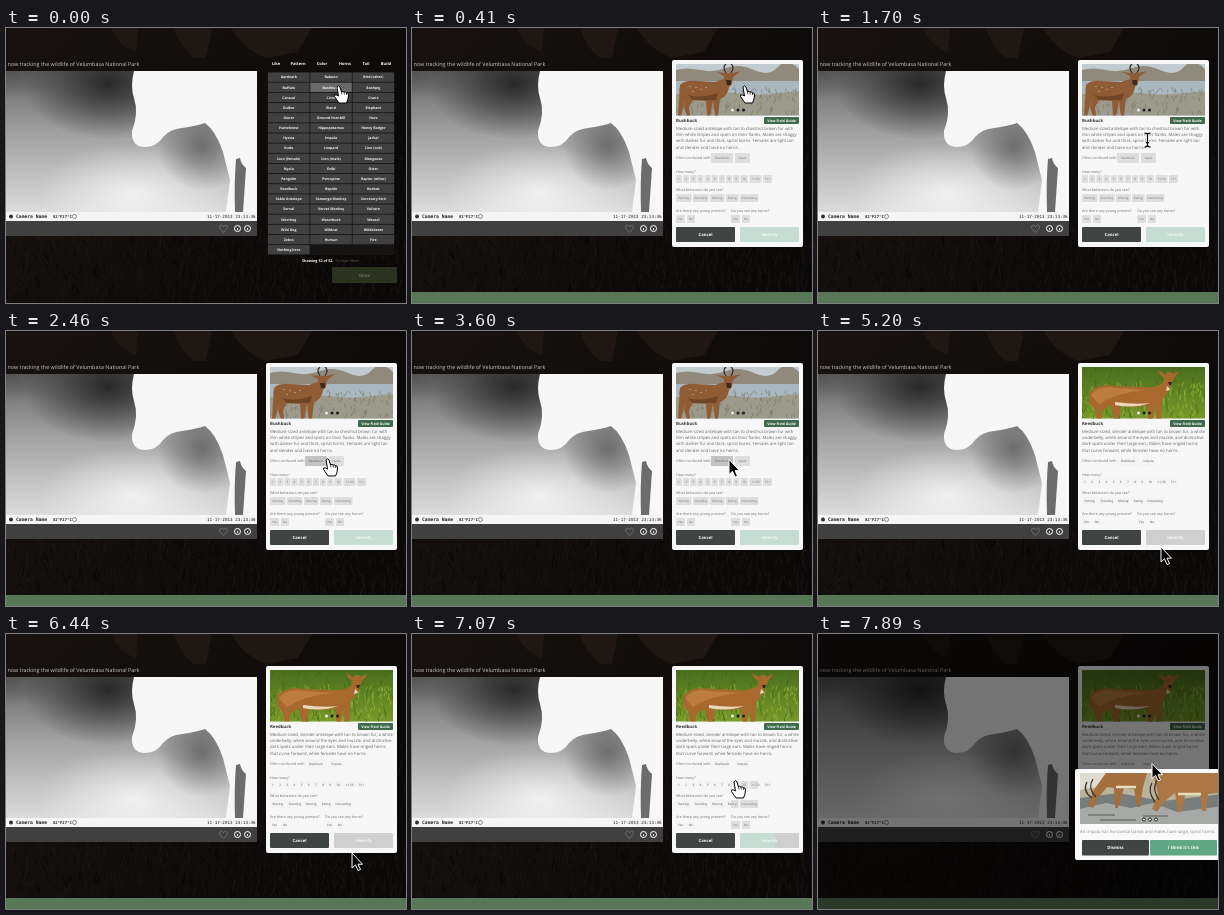
An HTML page that plays this animation: 400x275 px, repeating every 8000 ms.

```html
<!DOCTYPE html>
<html lang="en">
<head>
<meta charset="utf-8">
<title>Wildlife identification</title>
<style>
  html, body { margin: 0; width: 100%; height: 100%; overflow: hidden; background: #100d0c; }
  body > svg { display: block; width: 400px; height: 275px; }
  text { font-family: "Open Sans", sans-serif; text-rendering: geometricPrecision; }
  .mono { font-family: "DejaVu Sans Mono", monospace; }
  .b { font-weight: 700; }
  .mid { text-anchor: middle; }
</style>
</head>
<body>
<script>
const LOOP = 8000;

const rect = (x, y, w, h, fill, r = 0) =>
  `<rect x="${x}" y="${y}" width="${w}" height="${h}" rx="${r}" fill="${fill}"/>`;
const path = (d, fill, stroke = 'none', width = 1) =>
  `<path d="${d}" fill="${fill}" stroke="${stroke}" stroke-width="${width}" stroke-linejoin="round"/>`;
const circle = (x, y, r, fill, stroke = 'none') =>
  `<circle cx="${x}" cy="${y}" r="${r}" fill="${fill}" stroke="${stroke}"/>`;
const ellipse = (x, y, rx, ry, fill) =>
  `<ellipse cx="${x}" cy="${y}" rx="${rx}" ry="${ry}" fill="${fill}"/>`;
// y is the vertical middle of the line
const text = (s, x, y, size, fill, cls = '') =>
  `<text x="${x}" y="${y + size * 0.36}" font-size="${size}" fill="${fill}" class="${cls}">${s}</text>`;
const button = (s, x, y, w, h, fill, color, size, cls = 'mid', r = 1) =>
  rect(x, y, w, h, fill, r) + text(s, x + w / 2, y + h / 2, size, color, cls);
const group = (id, body) => `<g id="${id}">${body}</g>`;
const crop = (x, y, w, h, box, body) =>
  `<svg x="${x}" y="${y}" width="${w}" height="${h}" viewBox="${box}" preserveAspectRatio="xMidYMid slice">${body}</svg>`;

let seed = 7;
const random = () => (seed = seed * 16807 % 2147483647) / 2147483647;
const strokes = (n, x, y, w, h, len, lean) => {
  let d = '';
  for (let i = 0; i < n; i++) {
    d += `M${(x + random() * w).toFixed(1)} ${(y + random() * h).toFixed(1)}` +
         `l${((random() - 0.5) * lean).toFixed(1)} ${(-len * (0.4 + random())).toFixed(1)}`;
  }
  return d;
};

const definitions = `<defs>
  <linearGradient id="night" x2="0" y2="1"><stop stop-color="#666"/><stop offset=".45" stop-color="#a2a2a2"/><stop offset="1" stop-color="#dcdcdc"/></linearGradient>
  <radialGradient id="glow"><stop stop-color="#fff" stop-opacity=".7"/><stop offset="1" stop-color="#fff" stop-opacity="0"/></radialGradient>
  <radialGradient id="shade"><stop stop-color="#1c1c1c" stop-opacity=".85"/><stop offset="1" stop-color="#1c1c1c" stop-opacity="0"/></radialGradient>
  <radialGradient id="softShade"><stop stop-color="#444" stop-opacity=".6"/><stop offset="1" stop-color="#444" stop-opacity="0"/></radialGradient>
  <linearGradient id="page" x2="1" y2=".4"><stop stop-color="#17120f"/><stop offset="1" stop-color="#0b0908"/></linearGradient>
  <linearGradient id="lawn" x2="0" y2="1"><stop stop-color="#45691d"/><stop offset="1" stop-color="#7d9f2b"/></linearGradient>
  <clipPath id="passed"><path d="M319 143H346V196H363V214H319Z"/></clipPath>
</defs>`;

const background = rect(0, 0, 400, 275, 'url(#page)') +
  path('M105 0Q112 18 130 24L132 0ZM168 0Q174 20 188 30H200L206 0ZM225 0Q238 22 260 30L292 24 306 0Z', '#1f1713') +
  path(strokes(420, 0, 205, 400, 72, 11, 9) + strokes(90, 252, 50, 148, 170, 11, 9), 'none', '#1e1916', 0.6) +
  path(strokes(160, 0, 205, 400, 72, 9, 12), 'none', '#080606', 0.8);

const nightPhoto = crop(0, 43, 251, 141, '0 43 251 141',
  rect(0, 43, 251, 141, 'url(#night)') +
  ellipse(102, 56, 85, 56, 'url(#shade)') + ellipse(0, 43, 60, 28, 'url(#softShade)') +
  ellipse(128, 165, 95, 50, 'url(#glow)') + ellipse(196, 118, 45, 45, 'url(#softShade)') +
  path('M128 43Q124 58 128 70Q133 85 126 103Q125 118 138 119Q151 119 157 109Q164 101 176 100Q190 98 199 95Q210 103 217 124L224 152 220 184H251V43Z', '#f7f7f7') +
  path('M230 131Q228 155 229 184H237L240 140Q235 136 234 130Z', '#6c6c6c'));

const viewer =
  text('now tracking the wildlife of Velumbasa National Park', 1.5, 36, 5.4, '#c9c6c4') +
  nightPhoto + rect(0, 184, 251, 9, '#f5f5f5') + circle(5, 188.5, 2, '#333') +
  text('Camera Name', 10, 188.5, 4.7, '#222', 'mono b') +
  text('82°F27°C', 47, 188.5, 3.9, '#222', 'mono b') + circle(68.5, 188.5, 2, 'none', '#888') +
  text('11-17-2013 23:13:36', 201, 188.5, 4.25, '#222', 'mono') +
  rect(0, 193, 251, 15, '#404040') +
  path('M217.500 204.500L213.800 200.500Q212.700 197.500 215.300 197.200Q217 197.300 217.500 198.800Q218 197.300 219.700 197.200Q222.300 197.500 221.200 200.500Z', 'none', '#777', 0.8) +
  [231.5, 241.5].map(x => circle(x, 200.5, 3, 'none', '#fff') + rect(x - 0.5, 200, 1, 2, '#ddd')).join('');

const animals = `Aardvark,Baboon,Bird (other),Buffalo,Bushbuck,Bushpig,Caracal,Civet,Crane,Duiker,Eland,Elephant,
Genet,Ground Hornbill,Hare,Hartebeest,Hippopotamus,Honey Badger,Hyena,Impala,Jackal,Kudu,Leopard,Lion (cub),
Lion (female),Lion (male),Mongoose,Nyala,Oribi,Otter,Pangolin,Porcupine,Raptor (other),Reedbuck,Reptile,Rodent,
Sable Antelope,Samango Monkey,Secretary bird,Serval,Vervet Monkey,Vulture,Warthog,Waterbuck,Weasel,
Wild Dog,Wildcat,Wildebeest,Zebra,Human,Fire,Nothing here`.split(',').map(s => s.trim());

const tabs = { Like: 270, Pattern: 292, Color: 316, Horns: 339, Tail: 360, Build: 380 };
const list =
  Object.entries(tabs).map(([s, x]) => text(s, x, 35.5, 4, '#fff', 'b mid')).join('') +
  rect(261.5, 44, 127, 183, '#171514') +
  animals.map((s, i) => button(s, 262 + i % 3 * 42.3, 44.5 + Math.floor(i / 3) * 10.15, 41.5, 9.3,
    s === 'Bushbuck' ? '#696969' : '#404040', '#f2f2f2', 3.5, 'mid b', 0)).join('') +
  text('Showing 52 of 52.', 296, 232.5, 3.7, '#fff', 'b') + text('⟲ Clear filters', 330, 232.5, 3.6, '#6b6765') +
  button('Done', 326, 239, 65, 16, '#2c3220', '#6c7055', 4.3, 'mid b');

const dots = y => [320.5, 326, 331.5].map((x, i) => circle(x, y, 1.5, i ? '#1c1c1c' : '#eee')).join('');

const bushbuck = rect(264, 36, 123, 52, '#c2ccd0') +
  path('M264 42Q275 39 288 42T314 40 342 42 366 39 387 41V56H264Z', '#8f8a7c') +
  rect(264, 53, 123, 14, '#a9b7c0') + path('M264 66L300 63 345 67 387 63V88H264Z', '#9b9a8b') +
  path(strokes(110, 264, 62, 123, 26, 4, 5), 'none', '#77715d', 0.6) +
  path('M314 45Q310 39 314 36M319 45Q323 39 319 36', 'none', '#3d3027', 1.3) +
  path('M268 57Q273 52 284 53L303 54 312 51 312 48 304 44 313 45H320L329 43 321 49 320 56 317 59Q316 68 308 71L306 88H303L301 73 298 88H295L294 73 281 72 277 79 278 88H275L272 79 274 70 269 88H266Z', '#8f5c35') +
  path('M314 52H319L319 57H315Z', '#3c2a20') + path('M276 67Q288 71 306 65L304 72 281 72Z', '#704526') +
  path('M278 58v1M284 59v1M289 61v1M281 63v1M294 59v1', 'none', '#e3d2b8', 0.9);

const reedbuck = rect(264, 30, 123, 65, 'url(#lawn)') +
  path(strokes(140, 264, 55, 123, 43, 5, 5), 'none', '#9ab83b', 0.7) +
  path(strokes(110, 264, 38, 123, 58, 6, 5), 'none', '#41671b', 0.7) +
  path('M348 44L340 39 343 45 347 47 344 53Q336 57 326 56L298 55Q280 52 272 61L271 72 277 78 279 95H283L284 80 293 74 297 95H300L303 74Q318 78 329 74L331 95H334L337 74 340 95H343L344 68Q352 60 353 53L356 47 362 40 354 43 353 41H349Z', '#a9682e') +
  path('M297 74Q316 78 332 72Q318 74 297 71Z', '#ead9b9') + path('M273 64Q281 54 297 57L328 59Q300 61 281 73Z', '#bd7d3e') +
  path('M350 51H354L353 54H351Z', '#35271c') + path('M349 55Q352 57 352 59L348 60Z', '#e6d3b4');

const impalas = rect(262, 139, 143, 51, '#b9b39c') + path('M262 139H294L285 152 262 156Z', '#dedbd0') +
  path('M262 164L300 159 345 167 405 160V190H262Z', '#777d7b') +
  path('M262 175L288 169 313 174 335 169 359 178 405 172V190H262Z', '#a6aaa7') +
  path('M270 181H297M282 186H318M325 182H350', 'none', '#555a56', 1) +
  path('M288 139H329L325 153 322 173H319L316 155 306 154 300 174H297L296 154 289 153 280 164 275 174 270 172 275 157Z', '#a56e3d') +
  path('M335 139H405V158L390 160 388 177H384L382 160 367 161 364 178H360L357 159 347 167 339 178 334 175 340 160Z', '#ad7745') +
  path('M298 153H318M360 160H383', 'none', '#eadcc1', 2.5) +
  path('M274 164Q264 157 269 148M278 163Q269 154 275 145M337 168Q329 157 334 149M341 166Q333 154 340 145', 'none', '#40342a', 1.3);

const dark = '#404442';
const form = (names, pillFill, identifyFill, pillText) => {
  const pill = (s, x, y, w, h = 8) => button(s, x, y, w, h, pillFill, pillText, 3.1);
  const label = (s, x, y) => text(s, x, y, 3.65, '#707070');
  return label('Often confused with', 264, 130) + pill(names[0], 299, 125, 22, 10) + pill(names[1], 323, 125, 15, 10) +
    label('How many?', 264, 144) +
    Array.from({ length: 10 }, (_, i) => pill(i + 1, 264 + i * 7.15, 147, i < 9 ? 6 : 7.5)).join('') +
    pill('11-50', 337.5, 147, 12) + pill('51+', 351, 147, 9) +
    label('What behaviors do you see?', 264, 162) +
    pill('Resting', 264, 166, 15.5) + pill('Standing', 281, 166, 15.5) + pill('Moving', 298, 166, 14.5) +
    pill('Eating', 314, 166, 12.5) + pill('Interacting', 328, 166, 18.5) +
    label('Are there any young present?', 264, 183) + pill('Yes', 264, 187, 9) + pill('No', 275, 187, 8) +
    label('Do you see any horns?', 319, 183) + pill('Yes', 319, 187, 9) + pill('No', 330, 187, 8) +
    button('Cancel', 264, 199, 59, 15, dark, '#fff', 4.2, 'mid b') +
    button('Identify', 328, 199, 59, 15, identifyFill, '#f3f7f5', 4.2, 'mid b');
};

const paper = '#f7f7f7', palePill = '#dedede', paleGreen = '#c6ddd3';
const card = (title, picture, lines, body) =>
  rect(260, 32, 131, 187, paper, 2) + crop(264, 36, 123, 51.5, '264 36 123 51.5', picture) + dots(82) +
  text(title, 264, 92.5, 4.3, '#333', 'b') + button('View Field Guide', 352, 89, 35, 7, '#3f6a4c', '#fff', 3.5, 'mid b') +
  lines.map((s, i) => text(s, 264, 100.3 + i * 6.3, 4.25, '#666')).join('') + body;

const firstCard = card('Bushbuck', bushbuck, [
  'Medium-sized antelope with tan to chestnut brown fur with',
  'thin white stripes and spots on their flanks. Males are shaggy',
  'with darker fur and thick, spiral horns. Females are light tan',
  'and slender and have no horns.'
], form(['Reedbuck', 'Nyala'], palePill, paleGreen, '#777') +
  group('hover1', button('Reedbuck', 299, 125, 22, 10, '#c3c3c3', '#666', 3.1)));

const pair = ['Bushbuck', 'Impala'];
const secondCard = card('Reedbuck', reedbuck, [
  'Medium-sized, slender antelope with tan to brown fur, a white',
  'underbelly, white around the eyes and muzzle, and distinctive',
  'dark spots under their large ears. Males have ringed horns',
  'that curve forward, while females have no horns.'
], form(pair, '#f4f4f4', '#cfcfcf', '#555') +
  group('touched', `<g clip-path="url(#passed)">${rect(319, 143, 44, 71, paper) + form(pair, palePill, paleGreen, '#777')}</g>`) +
  group('hover2', button('Impala', 323, 125, 15, 10, '#c3c3c3', '#666', 3.1)));

const dialog = (x, height, picture, box, lines, buttonX, buttonW) => {
  const y = 135 + height - 20;
  return rect(x, 135, 155, height, '#fafafa', 2) + crop(x + 5, 139, 145, 51, box, picture) +
    lines.map((s, i) => text(s, x + 5, 197.3 + i * 6.5, 4.35, '#8a8a8a')).join('') +
    button('Dismiss', buttonX, y, buttonW, 15.5, dark, '#fff', 4.3, 'mid b') +
    button("I think it's this", buttonX + buttonW + 1, y, buttonW, 15.5, '#5fa785', '#fff', 4.3, 'mid b');
};

const cursors =
  group('arrow', path('M0 0V15L3.500 11.800L6 17.500L8.500 16.500L6 11.200H10.500Z', '#000', '#fff')) +
  group('hand', path('M-2 1Q-.5 -1.500 1 1L2.500 6Q4 4.500 5 6.200Q6.800 5 7.500 7Q9.500 6.300 9.500 9L9 13L7.500 17H0L-4.500 10.500Q-5 8 -2.500 9L-.5 10Z', '#fff', '#000') +
    path('M2.500 6L3 8.500M5 6.200L5.500 8.500M7.500 7L7.500 9', 'none', '#000', 0.7)) +
  group('beam', ['#fff', '#000'].map((c, i) =>
    path('M-3 -7Q0 -7 0 -5V5Q0 7 -3 7M3 -7Q0 -7 0 -5M0 5Q0 7 3 7M-1.500 2.500H1.500', 'none', c, i ? 1.2 : 2.4)).join(''));

document.body.innerHTML = `<svg viewBox="0 0 400 275">${definitions + background + viewer +
  group('list', list) +
  group('footer', rect(0, 264, 400, 11, '#577757')) +
  group('card1', firstCard) + group('card2', secondCard) +
  group('dim', rect(0, 0, 400, 275, '#000')) +
  group('dialog1', dialog(233, 98, reedbuck + dots(83), '264 36 123 51', [
    'A reedbuck has solid tan fur without white spots or stripes. Its horns',
    'are ringed and it has a large, black spot below the ears.'], 240, 70)) +
  group('dialog2', dialog(257, 91, impalas + [326, 332, 338].map(x => circle(x, 185.5, 1.5, '#fff', '#222')).join(''), '262 139 145 51', [
    'An impala has horizontal bands and males have large, spiral horns.'], 264, 67)) +
  group('cursor', cursors)}</svg>`;

const el = id => document.getElementById(id);
const show = (id, amount) => {
  el(id).style.opacity = +amount;
  el(id).style.display = +amount ? '' : 'none';
};
const ramp = (t, from, to) => Math.min(1, Math.max(0, (t - from) / (to - from)));

// [time, x, y] of the pointer hotspot
const track = [
  [0, 333, 58], [1090, 333, 58], [1400, 328, 85], [1700, 329.5, 112], [1930, 331, 126], [2250, 331, 127],
  [2580, 317, 128.5], [4215, 317, 128.5], [4260, 324, 157], [4550, 343, 216],
  [6350, 343, 216], [6560, 350, 223], [7070, 324, 147], [7190, 323.5, 142.5], [7220, 323.5, 142.5],
  [7600, 334, 129.5], [LOOP, 334, 129.5]
];
const pointerAt = t => {
  const i = track.findIndex(k => k[0] > t);
  const [t0, x0, y0] = track[i - 1], [t1, x1, y1] = track[i];
  const k = (t - t0) / (t1 - t0);
  return [x0 + (x1 - x0) * k, y0 + (y1 - y0) * k];
};
const between = (t, ...spans) => spans.some(([a, b]) => t >= a && t < b);

function draw(t) {
  const opened = ramp(t, 280, 410);
  const dialog1 = t < 5140 ? ramp(t, 3625, 3660) : 1 - ramp(t, 5120, 5200);
  const dialog2 = ramp(t, 7800, 7890);
  show('list', 1 - opened);
  show('footer', opened);
  show('card1', t < 5140 ? opened : 0);
  show('card2', t >= 5140);
  show('hover1', t > 2400 && t < 3660);
  show('touched', t > 6700);
  show('hover2', t > 7450 && t < 7830);
  show('dim', 0.53 * Math.max(dialog1, dialog2));
  show('dialog1', dialog1);
  show('dialog2', dialog2);

  const [x, y] = pointerAt(t);
  const hand = between(t, [0, 1130], [1990, 3600], [4720, 5140], [6950, 7130], [7500, 7830]);
  const beam = between(t, [1130, 1930]) && y > 97 && y < 123;
  el('cursor').setAttribute('transform', `translate(${x} ${y})`);
  show('hand', hand);
  show('beam', beam);
  show('arrow', !hand && !beam);
}

const start = performance.now();
function tick() {
  draw((performance.now() - start) % LOOP);
  requestAnimationFrame(tick);
}
tick();
</script>
</body>
</html>
```
